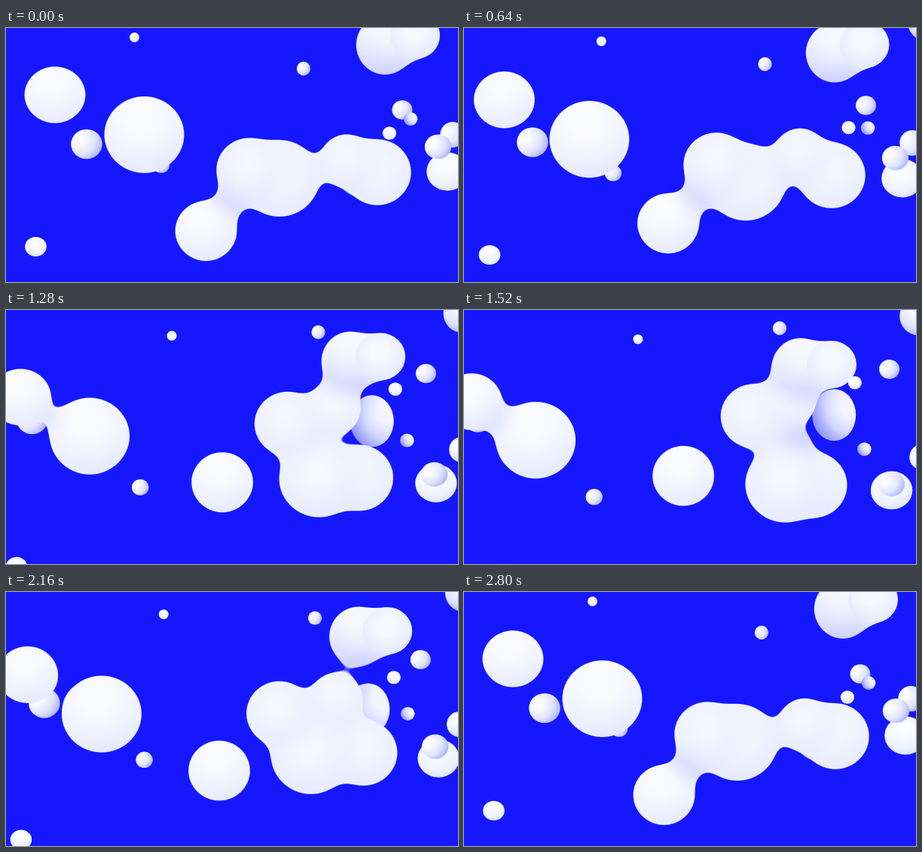
Recreate the animation shown at these times as an HTML page without scripts. Size 600 by 338 pixels, loop 2840 ms.

```html
<!DOCTYPE html>
<html lang="en">
<head>
<meta charset="utf-8">
<title>Floating blobs</title>
<style>
  html, body { margin: 0; width: 100%; height: 100%; overflow: hidden; background: #1518ff; }
  svg { display: block; width: 100vw; height: 100vh; }

  /* Each ball drifts through the poses a, b, c, d and back again. */
  ellipse { fill: url(#lit); animation: drift 2840ms infinite; }
  .soft { fill: url(#soft); }
  .right { fill: url(#shadeRight); }
  .left { fill: url(#shadeLeft); }
  .low { fill: url(#shadeLow); }
  .neck { fill: #d2d6ff; }

  @keyframes drift {
    0%     { translate: var(--a); animation-timing-function: cubic-bezier(.45, 0, .75, .45); }
    22.54% { translate: var(--b); animation-timing-function: cubic-bezier(.33, .28, .67, .65); }
    36.62% { translate: var(--c); animation-timing-function: cubic-bezier(.33, .45, .75, 1); }
    59.5%  { translate: var(--d); animation-timing-function: cubic-bezier(.3, 0, .67, .54); }
    77.36% { translate: var(--c); animation-timing-function: linear; }
    88.17% { translate: var(--b); animation-timing-function: cubic-bezier(.33, .63, .6, 1); }
    98.6%, 100% { translate: var(--a); }
  }
</style>
</head>
<body>
<svg viewBox="0 0 600 338" preserveAspectRatio="none">
  <defs>
    <radialGradient id="lit" cx=".45" cy=".3" r=".75">
      <stop offset=".2" stop-color="#fbfcff"/>
      <stop offset=".7" stop-color="#eef2ff"/>
      <stop offset="1" stop-color="#d8deff"/>
    </radialGradient>
    <radialGradient id="soft" cx=".48" cy=".4" r=".65">
      <stop offset=".3" stop-color="#f5f8ff"/>
      <stop offset="1" stop-color="#e2e7ff"/>
    </radialGradient>
    <radialGradient id="shadeRight" cx=".25" cy=".35" r=".8">
      <stop offset=".2" stop-color="#fafbff"/>
      <stop offset=".65" stop-color="#e0e4ff"/>
      <stop offset="1" stop-color="#acb0ff"/>
    </radialGradient>
    <radialGradient id="shadeLeft" cx=".85" cy=".3" r=".9">
      <stop offset=".25" stop-color="#f2f5ff"/>
      <stop offset=".6" stop-color="#d4d8ff"/>
      <stop offset="1" stop-color="#8a8eff"/>
    </radialGradient>
    <radialGradient id="shadeLow" cx=".5" cy=".2" r=".85">
      <stop offset=".3" stop-color="#f6f8ff"/>
      <stop offset=".7" stop-color="#e0e4ff"/>
      <stop offset="1" stop-color="#b0b4ff"/>
    </radialGradient>
    <filter id="goo" filterUnits="userSpaceOnUse" x="-70" y="-70" width="740" height="478" color-interpolation-filters="sRGB">
      <feGaussianBlur stdDeviation="10.5"/>
      <feColorMatrix values="1 0 0 0 0  0 1 0 0 0  0 0 1 0 0  0 0 0 24 -10.6"/>
    </filter>
  </defs>

  <rect width="600" height="338" fill="#1518ff"/>

  <!-- balls behind the merging shapes -->
  <ellipse class="right" rx="20.8" ry="19.8" style="--a:107px 154.5px; --b:91px 152px; --c:55px 148.5px; --d:13px 142px"/>
  <ellipse class="right" rx="11.2" ry="10.8" style="--a:206px 182px; --b:198px 193px; --c:185px 220px; --d:171px 253px"/>
  <ellipse class="left" rx="29" ry="34.5" style="--a:468px 190px; --b:474px 182px; --c:479px 158px; --d:493px 137px"/>

  <g filter="url(#goo)">
    <ellipse class="neck" rx="16" ry="16" style="--a:183px 142px; --b:166px 148px; --c:102px 154px; --d:38px 147px"/>
    <ellipse rx="41" ry="38" style="--a:65px 89px; --b:53.5px 95.5px; --c:31px 108.5px; --d:7px 124px"/>
    <ellipse rx="53" ry="51" style="--a:183.5px 142px; --b:166.5px 148px; --c:131px 161px; --d:90px 175px"/>
    <ellipse class="neck" rx="19" ry="19" style="--a:298px 231px; --b:309px 224px; --c:370px 205px; --d:454px 174px"/>
    <ellipse rx="41.3" ry="40.3" style="--a:265.5px 270px; --b:271px 260px; --c:282px 240px; --d:292.5px 218px"/>
    <ellipse class="soft" rx="45" ry="44" style="--a:493px 192px; --b:488px 196px; --c:476px 211.5px; --d:462px 236px"/>
    <ellipse class="soft" rx="53" ry="51" style="--a:363px 200px; --b:374px 205px; --c:402px 216px; --d:430px 234px"/>
    <ellipse class="soft" rx="44" ry="43" style="--a:323px 189px; --b:335px 182px; --c:360px 164px; --d:388px 138px"/>
    <ellipse class="soft" rx="36" ry="36" style="--a:452px 177px; --b:446px 169px; --c:439px 146px; --d:431px 116px"/>
    <ellipse class="low" rx="38.5" ry="40" style="--a:503px 22.5px; --b:492px 33px; --c:470px 57px; --d:443px 80px"/>
    <ellipse rx="33" ry="31.5" style="--a:543px 10px; --b:531.5px 22px; --c:508.5px 49px; --d:485px 76px"/>
  </g>

  <!-- balls that stay separate -->
  <ellipse class="soft" rx="33" ry="31.5" style="--a:543px 10px; --b:531.5px 22px; --c:508.5px 49px; --d:485px 76px"/>
  <ellipse class="low" rx="25" ry="25.5" style="--a:622px -16px; --b:614px -8px; --c:608.5px 0; --d:602.5px 9.5px"/>
  <ellipse rx="14.3" ry="13" style="--a:39.5px 291px; --b:34px 302px; --c:21.5px 326.5px; --d:6px 358px"/>
  <ellipse rx="6.5" ry="6.5" style="--a:170.5px 12.5px; --b:182.3px 17.7px; --c:206.5px 28.5px; --d:234.5px 40.5px"/>
  <ellipse class="right" rx="9.1" ry="9.2" style="--a:395px 54px; --b:399.5px 48px; --c:409px 36px; --d:420.5px 22.5px"/>
  <ellipse class="right" rx="13.5" ry="12.8" style="--a:526px 109px; --b:533.5px 103px; --c:548.5px 91.5px; --d:567px 77px"/>
  <ellipse class="left" rx="9.3" ry="9" style="--a:537px 121px; --b:536px 133px; --c:533.5px 159px; --d:531px 189px"/>
  <ellipse rx="9.1" ry="8.8" style="--a:509px 140px; --b:510.5px 132.5px; --c:514.3px 116px; --d:519.5px 94px"/>
  <ellipse class="right" rx="16.7" ry="17" style="--a:593px 142px; --b:595px 153px; --c:601px 173.5px; --d:609px 199px"/>
  <ellipse rx="27.7" ry="25.4" style="--a:586px 191px; --b:582px 200px; --c:575px 219px; --d:566.5px 243px"/>
  <ellipse class="right" rx="17.7" ry="16.3" style="--a:573.5px 158px; --b:572.5px 173px; --c:570px 202.5px; --d:567px 236px"/>
</svg>
</body>
</html>
```
